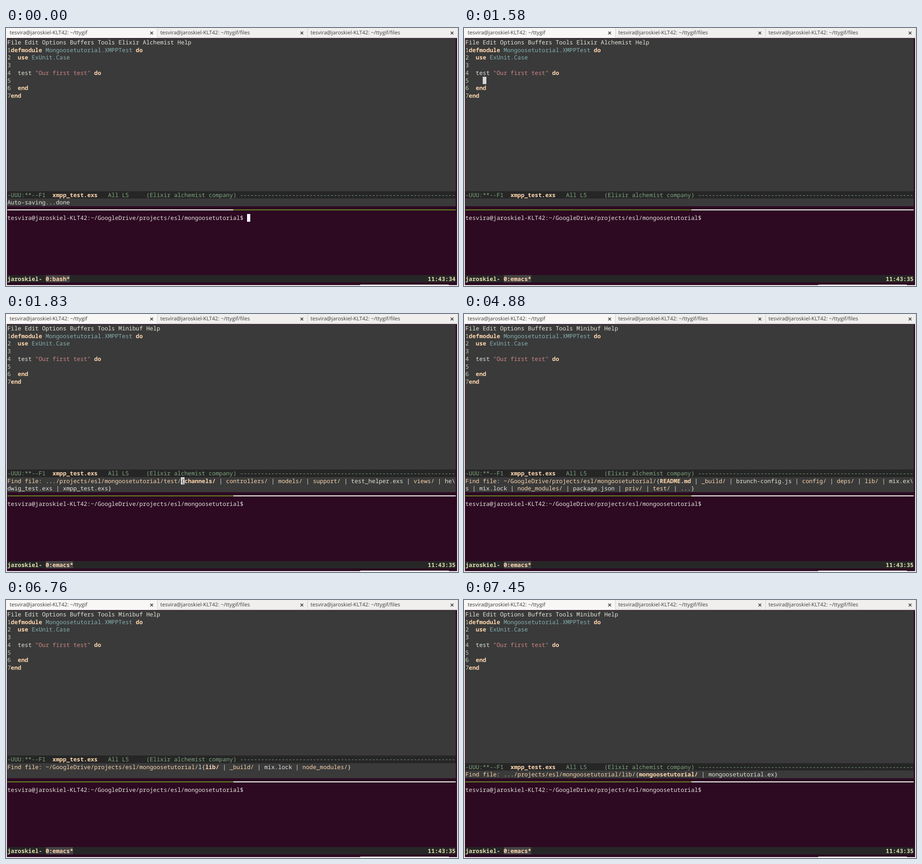
Recreate the animation shown at these times as an HTML page. Size 990x566 px, loop 8 s.

```html
<!DOCTYPE html>
<html lang="en">
<head>
<meta charset="utf-8">
<title>Terminal session</title>
<style>
  html, body { margin: 0; width: 100%; height: 100%; overflow: hidden; }
  body { position: relative; background: #f2f1f0; text-rendering: geometricPrecision; }
  div { position: absolute; }
  #stage { left: 0; top: 0; width: 990px; height: 566px; overflow: hidden; }
  .tab { top: 0; height: 21px; background: #f0efee; color: #3c3c3c;
         font: 11.5px/22px "Open Sans", "Noto Sans", sans-serif; white-space: pre;
         box-sizing: border-box; border-right: 1px solid #d2d0ce; border-bottom: 1px solid #d6d4d2; }
  .tab.on { background: #f8f7f6; line-height: 21px; border-bottom-color: #f8f7f6; }
  .tab span { position: absolute; left: 6px; }
  .tab.on span { left: 8px; }
  .tab svg { position: absolute; right: 8px; top: 7px; }
  #term { left: 2px; top: 22px; width: 986px; height: 542px; background: #2d0922; }
  .fill { left: 3px; width: 982px; }
  .row { left: 3px; height: 16.74px; color: #e4e4dc; white-space: pre;
         font: 12.683px/16.74px "Noto Sans Mono", "DejaVu Sans Mono", monospace; }
  .row span { display: inline-block; height: 16.74px; vertical-align: top; }
  .key { color: #ffd7af; font-weight: bold; }
  .dir { color: #f8d5ae; }
  .type { color: #87afaf; }
  .str { color: #d08787; }
  .num { color: #afd7af; }
  .mode { color: #7fa57f; }
  .only { color: #dfaf8f; font-weight: bold; }
  .tmux { color: #dfdfaf; font-weight: bold; }
  .win { color: #ffd7af; background: #444444; font-weight: bold; }
  .cur { color: #303030; background: #d7d7d7; }
  .hot { color: #303030; background: #ffd7af; font-weight: bold; }
  .shell { background: #ffffff; }
  .rule { top: 398px; height: 2px; }
</style>
</head>
<body>
<div id="stage"></div>
<script>
const TOP = 22.8, ROW = 16.74, COL = 7.61, LOOP = 8000;
const USER = 'tesvira', HOST = 'jaroskiel';
const LOGIN = `${USER}@${HOST}-KLT42:`;
const stage = document.getElementById('stage');

const span = (cls, text) => `<span class="${cls}">${text}</span>`;
const key = text => span('key', text);
const row = (n, html, col = 0) =>
  `<div class="row" style="top:${TOP + n * ROW}px;left:${3 + col * COL}px">${html}</div>`;
const fill = (n, count, color) =>
  `<div class="fill" style="top:${TOP + n * ROW}px;height:${count * ROW}px;background:${color}"></div>`;
const rule = (x, w, lit) =>
  `<div class="rule" style="left:${x}px;width:${w}px;background:${lit ? '#ffffff' : '#6b8a24'}"></div>`;
const tab = (x, w, path, on = '') =>
  `<div class="tab ${on}" style="left:${x}px;width:${w}px"><span>${LOGIN} ${path}</span>` +
  '<svg width="8" height="8"><path d="M1 1L7 7M7 1L1 7" stroke="#3c3c3c" stroke-width="1.7"/></svg></div>';

// Colours directory names in a list of candidates.
const list = text => text.split(' | ')
  .map(name => name.endsWith('/') ? span('dir', name) : name).join(' | ');
const find = (path, rest) => span('dir', 'Find file: ' + path) + rest;

const TEST = '.../projects/esl/mongoosetutorial/test/';
const ROOT = '~/GoogleDrive/projects/esl/mongoosetutorial/';
const testTail = list(' | controllers/ | models/ | support/ | test_helper.exs | views/ | he\\');
const rootTail = 's | ' + list('mix.lock | node_modules/ | package.json | priv/ | test/ | ...}');

const code = [
  span('num', '1') + key('defmodule') + ' ' + span('type', 'Mongoosetutorial.XMPPTest') + ' ' + key('do'),
  span('num', '2') + '  ' + key('use') + ' ' + span('type', 'ExUnit.Case'),
  span('num', '3'),
  span('num', '4') + '  test ' + span('str', '"Our first test"') + ' ' + key('do'),
  span('num', '5'),
  span('num', '6') + '  ' + key('end'),
  span('num', '7') + key('end')
].map((line, i) => row(i + 1, line)).join('');

const modeline = span('mode', '-UUU:**--F1  ') + key('xmpp_test.exs') +
  span('mode', '   All L5     (Elixir alchemist company) ' + '-'.repeat(62));

// Each step changes some of the state left by the one before.
const steps = [
  [0, { menu: 'Elixir Alchemist', mini: ['Auto-saving...done'], shell: true, cursor: false, win: 'bash', sec: 34 }],
  [180, { shell: false, cursor: true }],
  [280, { sec: 35 }],
  [450, { win: 'emacs' }],
  [1580, { mini: [''] }],
  [1830, { menu: 'Minibuf', cursor: false, mini: [
    find(TEST, span('cur', '{') + key('channels/') + testTail),
    'dwig_test.exs | xmpp_test.exs}'] }],
  [4780, { mini: [
    find(TEST, '{' + key('chan') + span('hot', 'n') + key('els/') + testTail), rootTail] }],
  [4880, { mini: [
    find(ROOT, '{' + key('README.md') +
      list(' | _build/ | brunch-config.js | config/ | deps/ | lib/ | mix.ex\\')), rootTail] }],
  [6760, { mini: [
    find(ROOT, 'l{' + key('lib/') + list(' | _build/ | mix.lock | node_modules/') + '}'), ''] }],
  [6940, { mini: [find(ROOT, 'li[' + span('only', 'lib/') + ']'), ''] }],
  [7090, { mini: [find(ROOT, 'lib[' + span('only', 'lib/') + ']'), ''] }],
  [7450, { mini: [
    find('.../projects/esl/mongoosetutorial/lib/', '{' + key('mongoosetutorial/') + ' | mongoosetutorial.ex}')] }]
];

let state = {};
const scenes = steps.map(([at, change]) => ({ at, ...(state = { ...state, ...change }) }));

stage.innerHTML =
  tab(0, 332, '~/ttygif', 'on') + tab(332, 329, '~/ttygif/files') + tab(661, 329, '~/ttygif/files') +
  '<div id="term"></div>' +
  '<div style="left:776px;top:563px;width:194px;height:3px;background:#fff"></div>' +
  fill(0, 22, '#3a3a3a') + fill(31, 1, '#262626') + code +
  '<div id="live" style="left:0;top:0"></div>';
const live = document.getElementById('live');

function draw(s) {
  const first = 22 - s.mini.length;
  live.innerHTML =
    row(0, `File Edit Options Buffers Tools ${s.menu} Help`) +
    (s.cursor ? row(5, span('cur', ' '), 5) : '') +
    fill(first - 1, 1, '#262626') + row(first - 1, modeline) +
    s.mini.map((line, i) => row(first + i, line)).join('') +
    rule(3, 495, s.shell) + rule(498, 487, !s.shell) +
    row(23, `${LOGIN}~/GoogleDrive/projects/esl/mongoosetutorial$ ` + (s.shell ? span('shell', ' ') : '')) +
    row(31, span('tmux', HOST + '- ') + span('win', `0:${s.win}*`)) +
    row(31, span('tmux', '11:43:' + s.sec), 121);
}

const start = performance.now();
let shown = null;
function tick() {
  const t = (performance.now() - start) % LOOP;
  const scene = scenes.findLast(s => s.at <= t) || scenes[0];
  if (scene !== shown) draw(shown = scene);
  requestAnimationFrame(tick);
}
tick();
</script>
</body>
</html>
```
